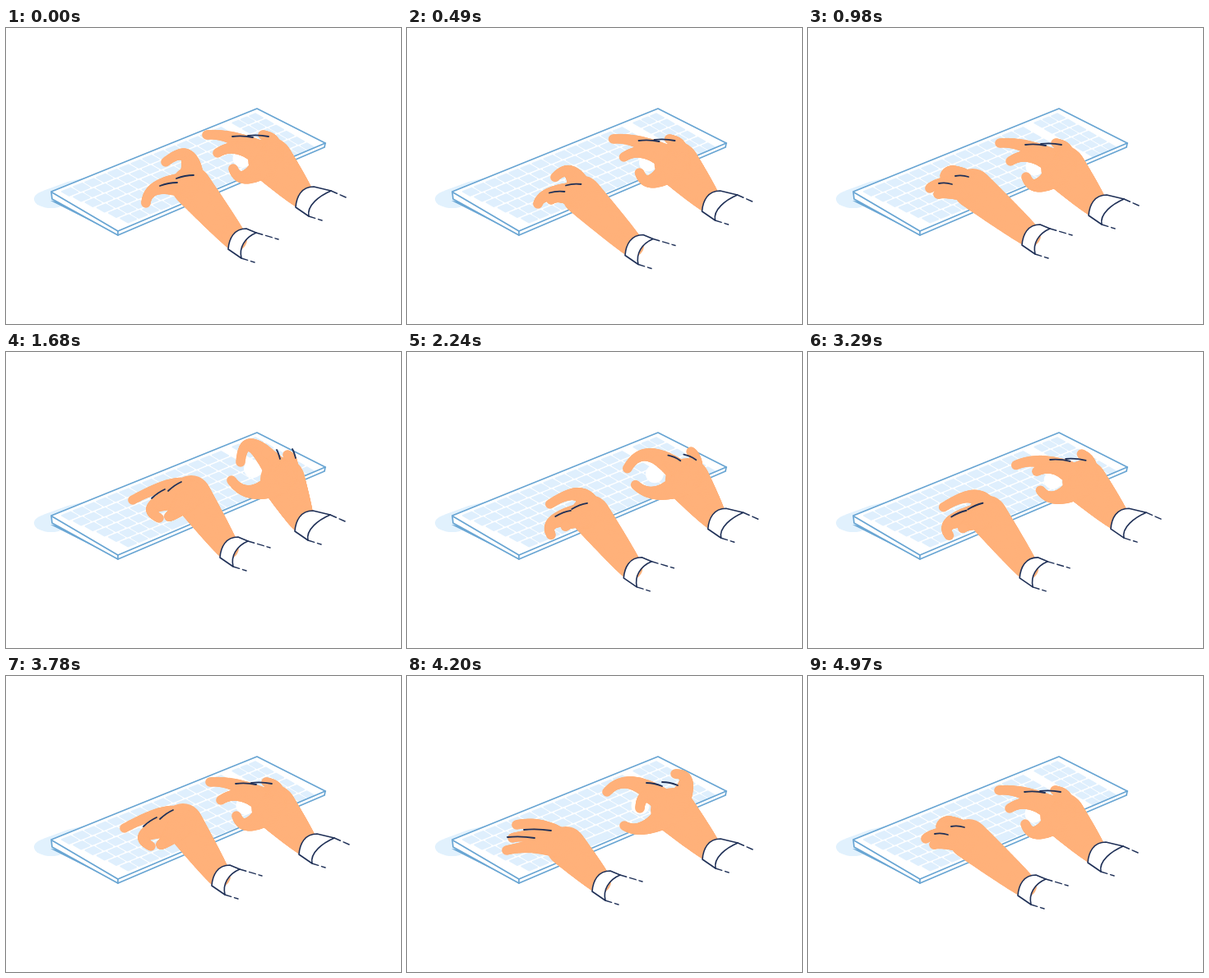
An HTML page with a canvas that plays this animation: 480 px wide and 360 px high, repeating every 5.04 s.

```html
<!DOCTYPE html>
<html lang="en">
<head>
<meta charset="utf-8">
<title>Typing hands</title>
<style>
html, body { margin: 0; width: 100%; height: 100%; overflow: hidden; background: #fff; }
canvas { display: block; width: 480px; height: 360px; }
</style>
</head>
<body>
<canvas id="stage" width="480" height="360"></canvas>
<script>
const ctx = document.getElementById('stage').getContext('2d');
const LOOP = 5040, STEP = 70;
const SKIN = '#ffb17a', NAVY = '#1f3057', BLUE = '#68a5d3', PALE = '#dfeffd', SHADE = '#e1f1fd';

// A pose is a small skeleton: wrist, palm centre, [joint, tip] per finger, and one knuckle crease.
const curl = {
  wrist: [279, 257], palm: [225, 192], crease: [[187, 192], [208, 188]],
  fingers: [[[220, 156], [194, 163]], [[185, 194], [170, 213]], [[204, 189], [192, 196]]]
};
const flat = {
  wrist: [269, 252], palm: [200, 195], crease: [[159, 189], [175, 190]],
  fingers: [[[178, 176], [166, 180]], [[166, 190], [148, 195]], [[172, 199], [158, 202]]]
};
const point = {
  wrist: [269, 238], palm: [225, 174], crease: [[177, 178], [193, 167]],
  fingers: [[[200, 163], [154, 180]], [[181, 187], [186, 202]], [[206, 194], [198, 200]]]
};
const spread = {
  wrist: [234, 250], palm: [193, 207], crease: [[122, 196], [155, 197]],
  fingers: [[[165, 184], [133, 181]], [[155, 196], [128, 197]], [[155, 207], [121, 212]]]
};

const reach = {
  wrist: [361, 206], palm: [321, 160], crease: [[275, 132], [300, 133]],
  fingers: [[[281, 136], [244, 130]], [[285, 146], [257, 152]], [[292, 181], [276, 171]], [[324, 139], [312, 130]]]
};
const arch = {
  wrist: [360, 206], palm: [336, 155], crease: [[329, 119], [333, 130]],
  fingers: [[[300, 114], [285, 134]], [[327, 132], [316, 123]], [[300, 170], [274, 156]], [[346, 136], [342, 125]]]
};
const stretch = {
  wrist: [365, 201], palm: [323, 157], crease: [[286, 131], [310, 134]],
  fingers: [[[273, 135], [232, 148]], [[298, 139], [272, 138]], [[287, 172], [259, 166]], [[332, 135], [326, 118]]]
};
const open = {
  wrist: [368, 211], palm: [323, 163], crease: [[291, 130], [310, 134]],
  fingers: [[[277, 131], [243, 141]], [[294, 146], [283, 161]], [[290, 184], [264, 182]], [[339, 130], [326, 119]]]
};

const beats = [0, 980, 1680, 2730, 3780, 4200, 4970];
const hands = [
  {
    palmSize: 27, cuffWidth: 43, sway: [12, 0], creaseGap: [19, -1], halo: true,
    poses: [reach, moved(reach, -11, 10), arch, stretch, moved(reach, 4, -1), open, moved(reach, -12, 9)]
  },
  {
    palmSize: 24, cuffWidth: 34, sway: [0, 10], creaseGap: [20, -9], halo: false,
    poses: [curl, flat, point, moved(curl, -4, 8), moved(point, -10, 5), spread, moved(flat, -5, 3)]
  }
];

const add = (p, q) => [p[0] + q[0], p[1] + q[1]];
const middle = (p, q) => mix(p, q, 0.5);

function mapPoints(node, change) {
  if (typeof node[0] === 'number') return change(node);
  if (Array.isArray(node)) return node.map(n => mapPoints(n, change));
  return Object.fromEntries(Object.entries(node).map(([k, v]) => [k, mapPoints(v, change)]));
}

function moved(pose, dx, dy) {
  return mapPoints(pose, p => [p[0] + dx, p[1] + dy]);
}

function mix(a, b, k) {
  if (typeof a === 'number') return a + (b - a) * k;
  if (Array.isArray(a)) return a.map((v, i) => mix(v, b[i], k));
  return Object.fromEntries(Object.keys(a).map(key => [key, mix(a[key], b[key], k)]));
}

function polygon(points, fill) {
  ctx.beginPath();
  points.forEach(p => ctx.lineTo(...p));
  ctx.closePath();
  ctx.fillStyle = fill;
  ctx.fill();
}

function line(points, color = NAVY, width = 1.6) {
  ctx.beginPath();
  points.forEach(p => ctx.lineTo(...p));
  ctx.strokeStyle = color;
  ctx.lineWidth = width;
  ctx.stroke();
}

function disc(x, y, r, fill, ry = r) {
  ctx.beginPath();
  ctx.ellipse(x, y, r, ry, 0, 0, 7);
  ctx.fillStyle = fill;
  ctx.fill();
}

// Tapered curve from a to c that passes through b.
function limb(a, b, c, thick, thin, taper) {
  const steps = 40;
  for (let i = 0; i <= steps; i++) {
    const s = i / steps, q = 1 - s;
    const at = n => a[n] * q * (q - s) + 4 * b[n] * q * s + c[n] * s * (s - q);
    disc(at(0), at(1), thin + (thick - thin) * q ** taper, SKIN);
  }
}

function crease([a, b]) {
  const [x, y] = middle(a, b);
  ctx.beginPath();
  ctx.moveTo(...a);
  ctx.quadraticCurveTo(x, y - 2, ...b);
  ctx.strokeStyle = NAVY;
  ctx.lineWidth = 1.8;
  ctx.stroke();
}

function cuff([x, y], width) {
  ctx.save();
  ctx.translate(x, y);
  ctx.beginPath();
  ctx.moveTo(0, 0);
  ctx.bezierCurveTo(1, -13, 7, -25, 22, -25);
  ctx.lineTo(width, -20);
  ctx.bezierCurveTo(width - 14, -14, 13, -2, 16, 11);
  ctx.closePath();
  ctx.fillStyle = '#fff';
  ctx.fill();
  ctx.strokeStyle = NAVY;
  ctx.lineWidth = 1.6;
  ctx.stroke();
  ctx.setLineDash([8, 4]);
  line([[width, -20], [61, -12]], NAVY, 1.4);
  line([[16, 11], [32, 16]], NAVY, 1.4);
  ctx.restore();
}

function drawHand(hand, t) {
  const i = Math.max(0, beats.findLastIndex((b, n) => b <= t && n < beats.length - 1));
  const p = Math.min(1, (t - beats[i]) / (beats[i + 1] - beats[i]));
  const { wrist, palm, fingers, crease: fold } =
    mix(hand.poses[i], hand.poses[i + 1], p * p * (3 - 2 * p));
  const swing = Math.sin(Math.PI * p);

  ctx.save();
  ctx.translate(hand.sway[0] * swing, hand.sway[1] * swing);
  if (hand.halo) disc(...middle(fingers[0][0], fingers[2][0]), 11, '#fff');
  limb(palm, middle(palm, wrist), wrist, hand.palmSize, 14, 0.8);
  fingers.forEach(([joint, tip]) => limb(palm, joint, tip, 17, 5.8, 2));
  crease(fold);
  crease(fold.map(q => add(q, hand.creaseGap)));
  cuff(add(wrist, [-9, 12]), hand.cuffWidth);
  ctx.restore();
}

const onBoard = (u, v) => [59 + 246 * u + 80 * v, 199 - 99 * u + 46 * v];

function keyCap(u, v, w, h) {
  polygon([onBoard(u, v), onBoard(u + w, v), onBoard(u + w, v + h), onBoard(u, v + h)], PALE);
  ctx.strokeStyle = PALE;
  ctx.lineWidth = 2;
  ctx.stroke();
}

function keyboard() {
  disc(55, 208, 21, SHADE, 11);
  polygon([[45, 198], [75, 187], [125, 175], [120, 185], [60, 215]], SHADE);
  polygon([[54, 210], [70, 212], [133, 250]], BLUE);
  polygon([[57, 199], [305, 98], [388, 140], [387, 145], [136, 252], [55, 208]], '#fff');

  const rows = 6, columns = 14, pitch = 0.94 / rows, height = pitch - 0.047;
  for (let r = 0; r < rows; r++) {
    const v = 0.045 + r * pitch, inset = r * 0.007, width = (0.8 - inset) / columns;
    for (let c = 0, span; c < columns; c += span) {
      span = r === rows - 1 && c === 4 ? 4 : 1;
      keyCap(0.022 + inset + c * width, v, span * width - 0.014, height);
    }
    for (let c = 0; c < 3; c++) keyCap(0.865 + c * 0.042, v, 0.029, height);
  }

  const rim = [[56, 208], [55, 199], [60, 197], [305, 98], [388, 140], [387, 145], [136, 252]];
  line([...rim, rim[0]], BLUE, 1.7);
  line([[56, 200], [136, 247], [388, 140]], BLUE, 1.7);
  line([[136, 247], [136, 252]], BLUE, 1.7);
}

function draw() {
  const t = Math.floor(performance.now() % LOOP / STEP) * STEP;
  ctx.fillStyle = '#fff';
  ctx.fillRect(0, 0, 480, 360);
  keyboard();
  hands.forEach(hand => drawHand(hand, t));
  requestAnimationFrame(draw);
}

ctx.lineJoin = ctx.lineCap = 'round';
draw();
</script>
</body>
</html>
```
